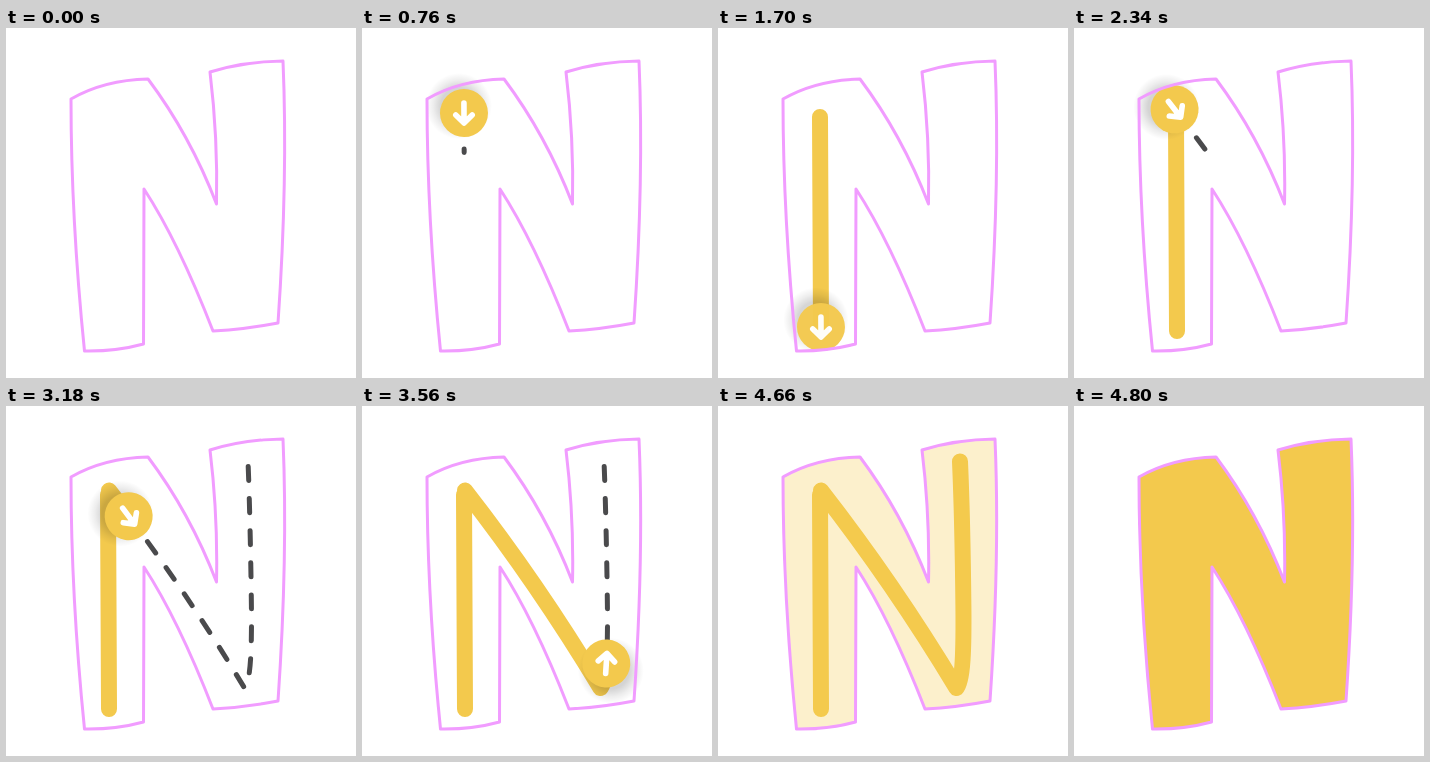
Animation of 350x350 px, one loop 6000 ms. Source, as an HTML page:

```html
<!DOCTYPE html>
<html lang="en">
<head>
<meta charset="utf-8">
<title>Letter tracing</title>
<style>
  html, body { margin: 0; width: 100%; height: 100%; overflow: hidden; background: #fff; }
  svg { display: block; width: 100vw; height: 100vh; }
  .guide, .ink, .arrow { fill: none; stroke-linecap: round; stroke-linejoin: round; }
  .guide { stroke: #4a4a4c; stroke-width: 5; }
  .ink { stroke: #f3c94d; stroke-width: 16; }
  .arrow { stroke: #fff; stroke-width: 5.6; }
  #outline { fill: none; stroke: #f19cff; stroke-width: 3; stroke-linejoin: round; }
  #fill { fill: #f3c94d; }
</style>
</head>
<body>
<svg viewBox="0 0 350 350">
  <defs>
    <radialGradient id="shade">
      <stop offset=".55" stop-opacity=".17"/>
      <stop offset=".78" stop-opacity=".07"/>
      <stop offset="1" stop-opacity="0"/>
    </radialGradient>
    <path id="letter" d="M65 71Q98 52 142 51Q184 107 210.500 176Q212 110 204 44Q238 33.500 277 33Q282 150 272 295Q238 301.500 207 303Q172 213 138 161L137.500 316Q110 323.500 78.500 323Q65 190 65 71Z"/>
  </defs>
  <g id="strokes"></g>
  <use href="#letter" id="fill" opacity="0"/>
  <g id="knob" opacity="0">
    <circle cx="5" cy="7" r="33" fill="url(#shade)"/>
    <circle r="24" fill="#f3c94d"/>
    <path class="arrow" d="M0 10V-9M-8.200-2L0-10L8.200-2"/>
  </g>
  <use href="#letter" id="outline"/>
</svg>
<script>
  const LOOP = 6000, DASH = 14, GAP = 18, LAG = 4;
  const $ = id => document.getElementById(id);
  const clamp = x => Math.min(1, Math.max(0, x));
  const ramp = (t, [a, b]) => clamp((t - a) / (b - a));
  const ease = x => x * x * (3 - 2 * x);

  // Time windows in ms: knob fades in, guide is drawn, knob travels, knob fades out
  const strokes = [
    { d: 'M102 89L103 303',
      show: [25, 165], guide: [632, 1132], move: [930, 1430], hide: [1695, 1865] },
    { d: 'M103 84.5Q175.500 177.500 238.500 282C245 276 245.800 240 245.400 200C245 160 243.500 90 242 55.500',
      show: [2085, 2225], guide: [2145, 3145], move: [3010, 4010], hide: [4195, 4345] }
  ];
  const fillTime = [4605, 4800];

  function addPath(cls, d) {
    const p = document.createElementNS('http://www.w3.org/2000/svg', 'path');
    p.setAttribute('class', cls);
    p.setAttribute('d', d);
    $('strokes').append(p);
    return p;
  }

  for (const s of strokes) {
    s.dashes = addPath('guide', s.d);
    s.ink = addPath('ink', s.d);
    s.len = s.ink.getTotalLength();
  }

  // Dash list that stops at the drawn length
  function dashesTo(len) {
    const list = [];
    for (let x = 0; x < len; x += DASH + GAP) list.push(Math.min(DASH, len - x), GAP);
    list[list.length - 1] = 2000;
    return list.join(' ');
  }

  function reveal(path, len, pattern) {
    path.style.display = len > 0 ? '' : 'none';
    if (len > 0) path.setAttribute('stroke-dasharray', pattern(len));
  }

  function placeKnob(s, pos, opacity) {
    const p = s.ink.getPointAtLength(pos);
    const a = s.ink.getPointAtLength(Math.max(0, pos - 1));
    const b = s.ink.getPointAtLength(Math.min(s.len, pos + 1));
    const turn = Math.atan2(b.y - a.y, b.x - a.x) * 180 / Math.PI + 90;
    $('knob').setAttribute('transform', `translate(${p.x} ${p.y}) rotate(${turn}) translate(0 ${LAG})`);
    $('knob').setAttribute('opacity', opacity);
  }

  function draw(t) {
    for (const s of strokes) {
      const pos = s.len * ease(ramp(t, s.move));
      reveal(s.dashes, s.len * ease(ramp(t, s.guide)), dashesTo);
      reveal(s.ink, pos, len => `${len} 2000`);
      if (t >= s.show[0] || s === strokes[0]) {
        placeKnob(s, pos, ramp(t, s.show) * (1 - ramp(t, s.hide)));
      }
    }
    $('fill').setAttribute('opacity', ramp(t, fillTime));
  }

  function tick() {
    draw(performance.now() % LOOP);
    requestAnimationFrame(tick);
  }
  tick();
</script>
</body>
</html>
```
